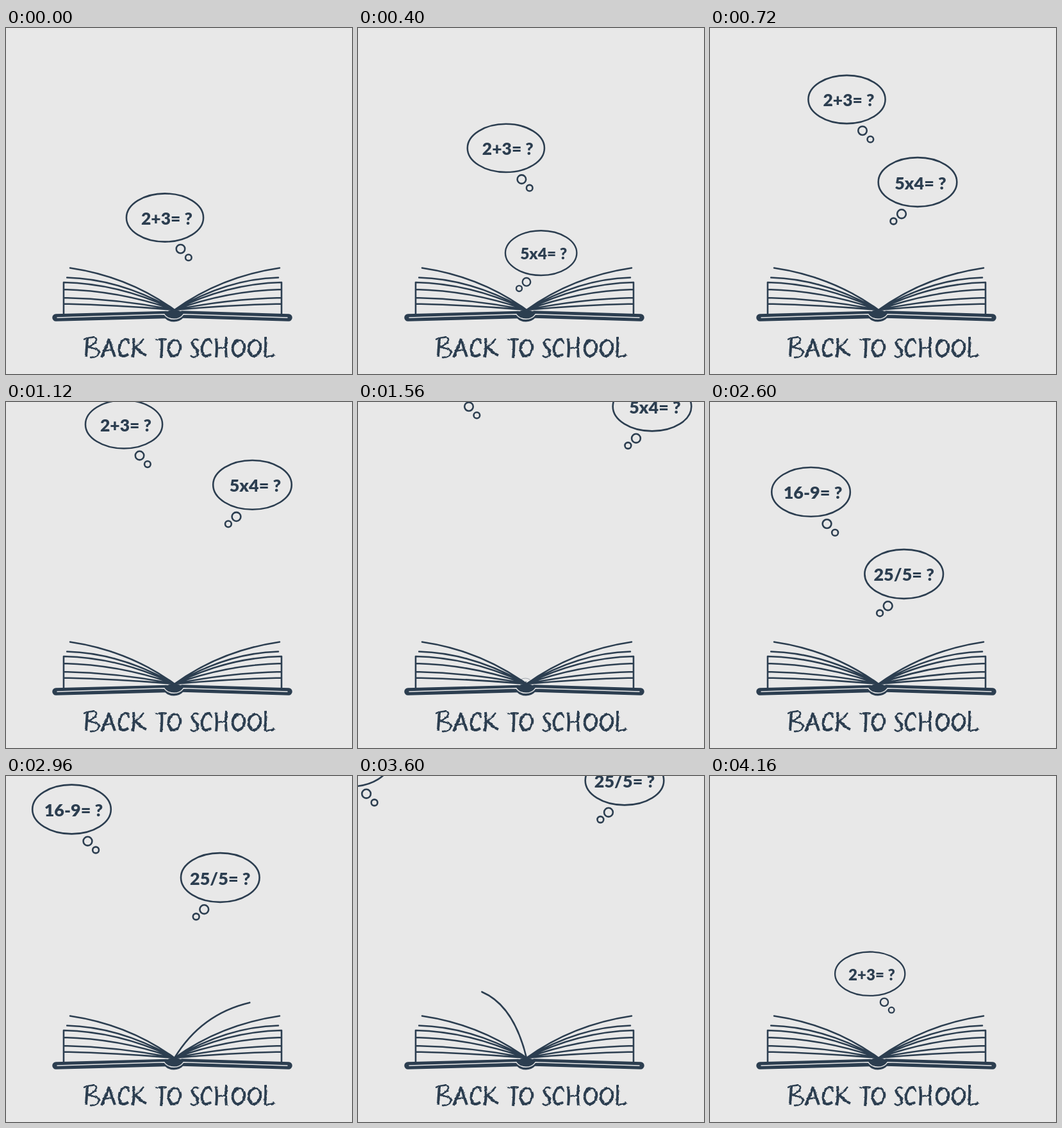
Recreate the animation shown at these times as an HTML page. Size 540x540 px, loop 4.2 s.

```html
<!DOCTYPE html>
<html lang="en">
<head>
<meta charset="utf-8">
<title>Back to school</title>
<style>
  html, body { margin: 0; width: 100%; height: 100%; overflow: hidden; background: #e8e8e8; }
  svg { display: block; width: 100vw; height: 100vh; }
  .line { fill: none; stroke: #2c3e50; stroke-width: 2.6; stroke-linecap: round; stroke-linejoin: round; }
  .cover { stroke-width: 11.5; }
  .light { fill: none; stroke: #e8e8e8; stroke-width: 1.4; stroke-linecap: round; }
  .ink { fill: #2c3e50; }
  text { font: 900 27px Lato, "Open Sans", sans-serif; fill: #2c3e50; stroke: none; text-anchor: middle; white-space: pre; }
  #title { fill: none; stroke: #2c3e50; stroke-linejoin: bevel; }
</style>
</head>
<body>
<svg viewBox="0 0 540 540">
  <defs>
    <filter id="rough" x="-5%" y="-20%" width="110%" height="140%" color-interpolation-filters="sRGB">
      <feTurbulence type="fractalNoise" baseFrequency="0.2" numOctaves="2" seed="4"/>
      <feDisplacementMap in="SourceGraphic" scale="3" xChannelSelector="R" yChannelSelector="G"/>
    </filter>
  </defs>

  <g id="bubbles" class="line"></g>
  <path id="page" class="line"/>
  <path id="leaves" class="line"/>
  <path class="line cover" d="M78 452L250 447.5M441 452L275 447"/>
  <path class="ink" d="M246 446Q254 439 262 440Q270 439 278 446L277 452Q271 458.5 262 458.5Q253 458.5 247 452Z"/>
  <path class="light" d="M80 452L247 446.8Q252 454 262 454.3Q272 454 277 446.8L439 452"/>
  <g id="title" role="img" aria-label="BACK TO SCHOOL" filter="url(#rough)"></g>
</svg>

<script>
const LOOP = 4200, STEP = 40, GROW = 440, LIFE = 2400;
const TURN_START = 2800, TURN_TIME = 1120;
const SPINE = { x: 263, y: 440 };
const $ = id => document.getElementById(id);

function add(parent, tag, attrs, text) {
  const el = document.createElementNS("http://www.w3.org/2000/svg", tag);
  for (const k in attrs) el.setAttribute(k, attrs[k]);
  if (text) el.textContent = text;
  return parent.appendChild(el);
}

// Smooth curve through [time, x, y] keys; starts at rest and runs on past the last key
function glide(keys, t) {
  const last = keys.length - 1;
  let i = 0;
  while (i < last - 1 && t > keys[i + 1][0]) i++;
  const a = keys[i], b = keys[i + 1], h = b[0] - a[0];
  const u = (t - a[0]) / h, u2 = u * u, u3 = u2 * u;
  const slope = (j, k) => {
    if (j === 0) return 0;
    const p = keys[j - 1], q = keys[Math.min(last, j + 1)];
    return (q[k] - p[k]) / (q[0] - p[0]);
  };
  return [1, 2].map(k =>
    a[k] + (b[k] - a[k]) * (3 * u2 - 2 * u3)
    + h * ((u3 - 2 * u2 + u) * slope(i, k) + (u3 - u2) * slope(i + 1, k)));
}

// Bubbles: side is where the tail hangs, keys are [ms since birth, x, y]
const bubbles = [
  { text: "2+3= ?", dx: 3, side: 1, size: 0.98, start: 3760,
    keys: [[440, 248, 296], [1160, 213.5, 111.5], [2000, 148.5, -41.5]] },
  { text: "5x4= ?", dx: 4.5, side: -1, size: 1, start: 0,
    keys: [[720, 324, 240.5], [1560, 459, 7]] },
  { text: "16-9= ?", dx: 3, side: 1, size: 1, start: 1494,
    keys: [[706, 209, 253], [1466, 102.5, 52], [2106, -12, -22]] },
  { text: "25/5= ?", dx: 0, side: -1, size: 1, start: 1927,
    keys: [[273, 274, 391], [1033, 334.3, 158.5], [1673, 416, 7]] }
];

for (const b of bubbles) {
  b.keys.unshift([0, 262, 440]);
  b.el = add($("bubbles"), "g", {});
  add(b.el, "ellipse", { rx: 61.3, ry: 38.4 });
  add(b.el, "circle", { cx: 25 * b.side, cy: 49.7, r: 6.9 });
  add(b.el, "circle", { cx: 37.6 * b.side, cy: b.side > 0 ? 63.5 : 61, r: 4.9 });
  add(b.el, "text", { x: b.dx, y: 11 }, b.text);
}

// A leaf bends from its edge to the spine; offsets are measured from the spine
const leaf = (x, y, cx, cy) =>
  `M${SPINE.x + x} ${SPINE.y - y}Q${SPINE.x + cx} ${SPINE.y - cy} ${SPINE.x} ${SPINE.y}`;

// Top leaf at progress p: 0 lies on the right, 1 on the left
function topLeaf(p) {
  const lift = Math.sin(Math.PI * p), x = 164 - 327 * p;
  return leaf(x, 65.5 + 48 * lift, x * (0.44 - 0.2 * lift), 52 + 38 * lift);
}

let stack = topLeaf(0) + topLeaf(1);
for (const reach of [-173, 167]) {
  for (const y of [50.5, 43, 32, 19, 9.5]) {
    const x = y > 50 ? reach * 0.97 : reach;
    stack += leaf(x, y, reach * 0.49, y - 2);
  }
  stack += `M${SPINE.x + reach} 397V446`;
}
$("leaves").setAttribute("d", stack);

// Brush letters: [advance, heavy strokes, fine strokes]
const glyphs = {
  B: [27, "M6 2L4 32", "M0 5Q21 -2 20 6Q18 13 7 17Q26 20 24 26Q21 34 10 33"],
  A: [27, "M13 4Q16 18 22 32M13 4Q8 18 1 33", "M4 23L20 21"],
  C: [21, "M16 8Q13 2 7 7Q-1 16 3 28Q7 34 16 28", "M16 8L17 12"],
  K: [26, "M3 3Q5 18 2 33M6 17Q14 26 23 30", "M19 4Q12 13 4 19"],
  T: [19, "M10 5Q11 18 9 34", "M0 6Q9 3 18 5"],
  O: [25, "M11 6Q0 10 2 23Q6 35 15 29Q23 20 19 11", "M19 11Q14 3 7 9"],
  S: [16, "M2 9Q3 15 9 20Q14 27 9 31", "M13 7Q6 2 2 9M9 31Q4 35 0 30"],
  H: [27, "M3 4Q5 18 3 33M19 2Q17 18 19 33", "M3 20Q10 17 19 18"],
  L: [17, "M3 1Q4 16 2 31", "M1 31Q9 33 17 29"]
};
let pen = 121;
for (const ch of "BACK TO SCHOOL") {
  const [advance, heavy, fine] = glyphs[ch] || [11];
  if (heavy) {
    const g = add($("title"), "g", { transform: `translate(${pen} 481)` });
    add(g, "path", { d: heavy, "stroke-width": 4 });
    add(g, "path", { d: fine, "stroke-width": 2.6 });
  }
  pen += advance;
}

function draw(t) {
  for (const b of bubbles) {
    const age = (t - b.start + LOOP) % LOOP;
    const size = b.size * Math.min(1, age / GROW);
    const alive = age > 0 && age < LIFE;
    b.el.setAttribute("visibility", alive ? "visible" : "hidden");
    if (!alive) continue;
    const [x, y] = glide(b.keys, age);
    b.el.setAttribute("transform", `translate(${x} ${y}) scale(${size})`);
  }
  const p = (t - TURN_START) / TURN_TIME;
  $("page").setAttribute("d", p > 0 && p < 1 ? topLeaf(p) : "");
}

const begin = performance.now();
function tick() {
  const t = (performance.now() - begin) % LOOP;
  draw(Math.floor(t / STEP) * STEP);
  requestAnimationFrame(tick);
}
tick();
</script>
</body>
</html>
```
